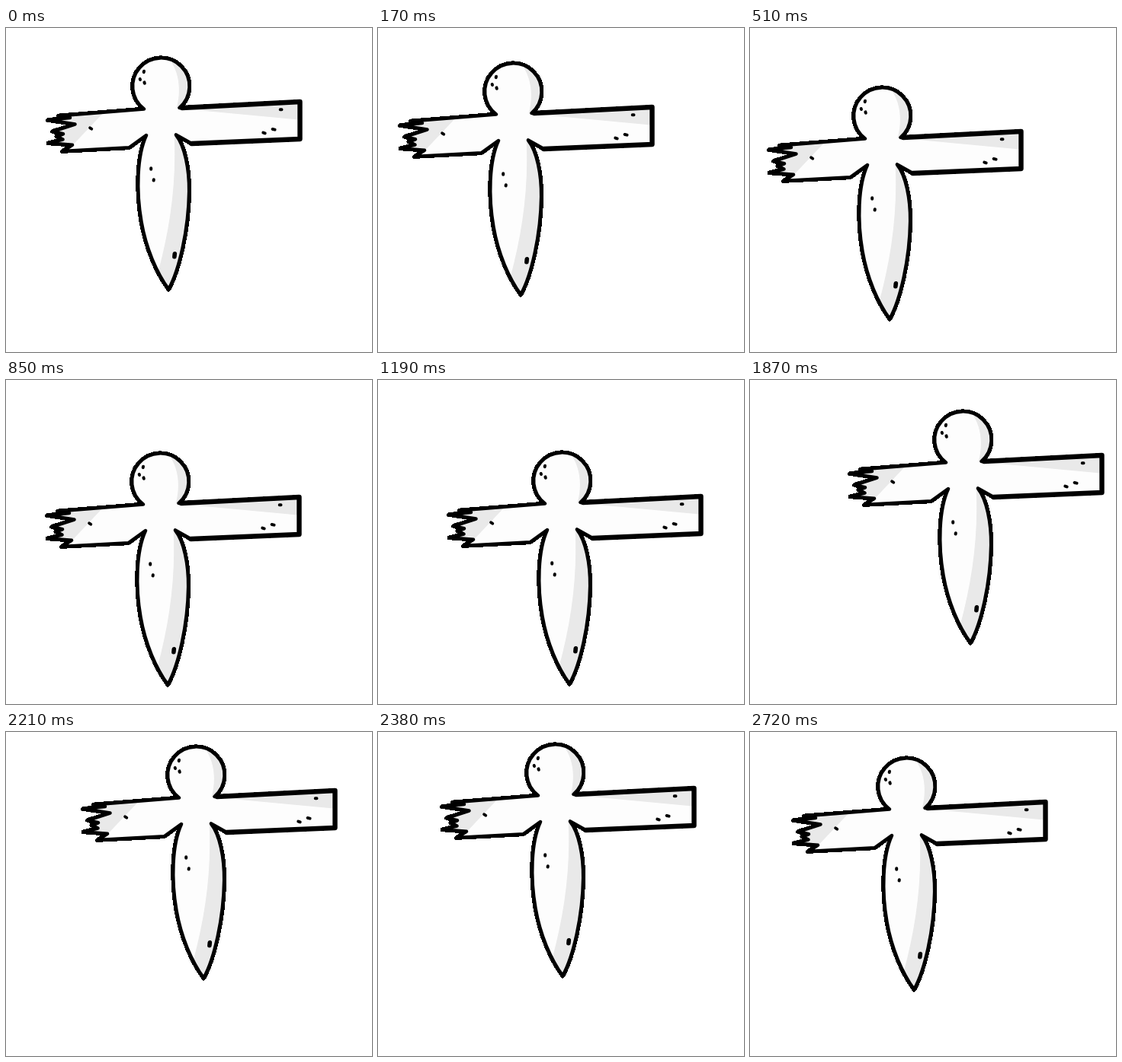
These frames come from a looping animation (480 px wide and 426 px high, 2890 ms). An HTML page:

```html
<!DOCTYPE html>
<html lang="en">
<head>
<meta charset="utf-8">
<title>Drifting bone figure</title>
<style>
  html, body { margin: 0; width: 100%; height: 100%; overflow: hidden; background: #fff; }
  svg { display: block; width: 480px; height: 426px; }
  .ink { fill: none; stroke: #000; stroke-width: 4.6; stroke-linejoin: round; stroke-linecap: round; }
  .edge { stroke-width: 5.8; shape-rendering: crispEdges; }
  .shade { fill: #e9e9e9; }
</style>
</head>
<body>
<svg viewBox="0 0 480 426">
  <defs>
    <path id="outline" d="M181 106.5 A37.3 37.3 0 1 1 227.5 105
      L385.5 97 V146 L243.5 152 L223 140.5
      C234.5 155 240.5 185 240.2 215 C239.5 265 227.5 318 213.2 343.7
      C197.5 322 183.5 290 177.5 255 C170.5 215 171.5 168 184 141
      L161.5 157.3 L74 162 L87 153.8 L55.5 151.3 L74.5 146.5 L66.5 142.5
      L75 139.3 L61 136 L90.5 126.5 L55 121 L84 118 L69 115.5 Z"/>
    <clipPath id="inside"><use href="#outline"/></clipPath>
  </defs>
  <g id="figure">
    <use href="#outline" class="ink edge"/>
    <use href="#outline" fill="#fdfdfd"/>
    <g class="shade" clip-path="url(#inside)">
      <path d="M210 36 C228 55 230 82 223.5 106 L250 100 V36 Z"/>
      <path d="M131 108 L80 162 H45 V108 Z"/>
      <path d="M229 106 L390 121 V92 Z"/>
      <path d="M220.5 139 C224 205 214.5 265 200 319 L213 348 L248 300 V170 Z"/>
    </g>
    <use href="#outline" class="ink"/>
    <path class="ink" style="stroke-width:6.4" d="M243.5 152 L385.5 146 V97 L231 105"/>
    <path class="ink" style="stroke-width:4" d="M181 56.7 l-.3 1.4 M175.7 67 l.3 1 M181.4 71.4 l.4 1.4
      M110.2 131.4 l2 1.2 M359.7 107.3 h1.8 M337.3 137.6 l2.4 .8 M349.6 133 l3 .6
      M190.2 184.2 v1.6 M193.8 199.2 l-.2 1.4"/>
    <path class="ink" style="stroke-width:5.6" d="M221.3 296.8 l-.4 4"/>
  </g>
</svg>
<script>
  const STEP = 170;

  // The drift is a closed chain of three curves: duration in steps, two handles, end point
  const start = [2, -5.5];
  const curves = [
    [3, [25, 1.75], [-46.5, 0], [-37, 23]],
    [8, [-28, 71.5], [61, 71.5], [83, 18]],
    [6, [77, -16], [18.5, -41.5], start]
  ];

  const bezier = (a, b, c, d, u) => {
    const v = 1 - u;
    return v * v * v * a + 3 * v * v * u * b + 3 * v * u * u * c + u * u * u * d;
  };

  const places = [];
  let from = start;
  for (const [steps, b, c, to] of curves) {
    for (let i = 0; i < steps; i++) {
      places.push([0, 1].map(k => Math.round(bezier(from[k], b[k], c[k], to[k], i / steps))));
    }
    from = to;
  }
  places.push(places.shift()); // the loop opens one step into the chain

  const frames = [...places, places[0]].map(([x, y], i) => ({
    offset: i / places.length,
    transform: `translate(${x}px, ${y}px)`,
    easing: 'step-end'
  }));
  document.getElementById('figure').animate(frames, {
    duration: STEP * places.length,
    iterations: Infinity
  });
</script>
</body>
</html>
```
